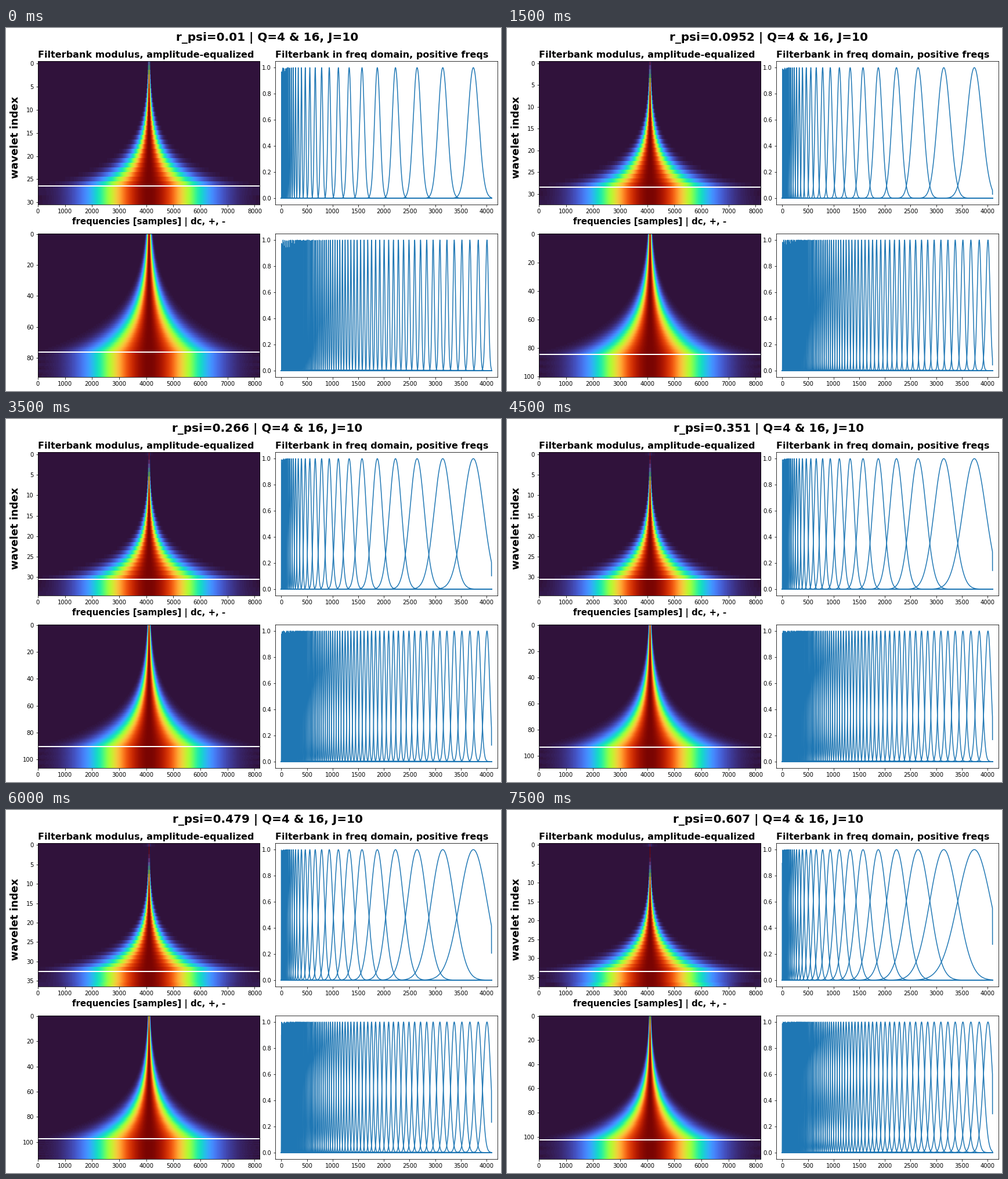
Animation, 853 px wide and 625 px high, one loop 8000 ms. Source, as a matplotlib script:

```python
import matplotlib.pyplot as plt
import numpy as np
from matplotlib.animation import FuncAnimation
from matplotlib.ticker import MultipleLocator

plt.rcParams["font.family"] = "DejaVu Sans"

WIDTH, HEIGHT, DPI = 853, 625, 72
N = 8192                      # signal length
J = 10
SIGMA_MIN = 0.13 / 2**J       # narrowest allowed bandwidth
R_PSI = np.linspace(0.01, 0.99, 24)
INTERVAL = 500
FRAMES = 16                   # the first state is held for two frames
FREQS = np.arange(N // 2 + 1)


def filter_params(Q, r):
    """Centre frequencies, bandwidths and the number of constant-Q wavelets."""
    ratio = 2 ** (1 / Q)
    xi_max = 1 / (1 + ratio)
    overlap = (1 - 1 / ratio) / (1 + 1 / ratio)
    sigma_max = xi_max * overlap / np.sqrt(2 * np.log(1 / r))
    n_cqt = int(np.ceil(Q * np.log2(sigma_max / SIGMA_MIN)))
    scale = ratio ** -np.arange(n_cqt)
    xi, sigma = xi_max * scale, sigma_max * scale
    low_xi = xi[-1] * np.arange(Q, 0, -1) / (Q + 1)
    xi = np.concatenate([xi, low_xi])
    sigma = np.concatenate([sigma, np.full(Q, SIGMA_MIN)])
    return xi * N, sigma * N, n_cqt


def morlet_bank(xi, sigma):
    """Analytic Morlet wavelets on the non-negative frequencies."""
    xi, sigma = xi[:, None], sigma[:, None]
    kappa = np.exp(-0.5 * (xi / sigma) ** 2)
    psi = np.exp(-0.5 * ((FREQS - xi) / sigma) ** 2)
    psi -= kappa * np.exp(-0.5 * (FREQS / sigma) ** 2)
    psi[:, -1] /= 2
    return psi


def time_modulus(psi):
    mod = np.fft.fftshift(np.abs(np.fft.ifft(psi, N, axis=1)), axes=1)
    return mod / mod.max(axis=1, keepdims=True)


fig = plt.figure(figsize=(WIDTH / DPI, HEIGHT / DPI), dpi=DPI, facecolor="white")
grid = fig.add_gridspec(
    2, 2, left=54.8 / WIDTH, right=846.8 / WIDTH,
    top=1 - 57 / HEIGHT, bottom=1 - 601 / HEIGHT, wspace=0.07, hspace=0.2)


def label(x, y, text, size, **kw):
    """Bold text centred on x with its baseline at y, in pixels from top left."""
    return fig.text(x / WIDTH, 1 - y / HEIGHT, text, size=size, weight="bold",
                    ha="center", va="baseline", **kw)


class BankRow:
    """One row of panels: time modulus on the left, spectra on the right."""

    def __init__(self, row, Q, tick_step):
        self.Q = Q
        self.map_ax = fig.add_subplot(grid[row, 0])
        self.freq_ax = fig.add_subplot(grid[row, 1])
        self.image = self.map_ax.imshow(
            np.zeros((2, N)), cmap="turbo", vmin=0, vmax=1,
            aspect="auto", interpolation="nearest")
        self.divider = self.map_ax.axhline(0, color="white", lw=2)
        self.map_ax.set_xlim(-0.5, N - 0.5)
        self.map_ax.xaxis.set_major_locator(MultipleLocator(1000))
        self.map_ax.yaxis.set_major_locator(MultipleLocator(tick_step))

        margin = 0.028 * N / 2
        self.freq_ax.set_xlim(-margin, N / 2 + margin)
        self.freq_ax.set_ylim(-0.05, 1.05)
        self.freq_ax.xaxis.set_major_locator(MultipleLocator(500))
        self.freq_ax.yaxis.set_major_locator(MultipleLocator(0.2))

    def show(self, r):
        xi, sigma, n_cqt = filter_params(self.Q, r)
        psi = morlet_bank(xi, sigma)
        n = len(xi)
        self.image.set_data(time_modulus(psi))
        self.image.set_extent((-0.5, N - 0.5, n - 0.5, -0.5))
        self.map_ax.set_ylim(n - 0.5, -0.5)
        self.divider.set_ydata([n_cqt - 0.5] * 2)
        for line in list(self.freq_ax.lines):
            line.remove()
        self.freq_ax.plot(FREQS, psi.T, color="tab:blue", lw=1.5)


rows = [BankRow(0, 4, 5), BankRow(1, 16, 20)]
title_style = dict(loc="left", fontsize=16, fontweight="bold")
rows[0].map_ax.set_title("Filterbank modulus, amplitude-equalized", **title_style)
rows[0].freq_ax.set_title("Filterbank in freq domain, positive freqs", **title_style)
label(246, 338, "frequencies [samples] | dc, +, -", 15)
label(21, 188, "wavelet index", 18, rotation=90, rotation_mode="anchor")
heading = label(450.6, 22, "", 20)


def update(i):
    r = R_PSI[max(0, i - 1)]
    heading.set_text(f"r_psi={r:.3g} | Q=4 & 16, J={J}")
    for row in rows:
        row.show(r)
    return []


anim = FuncAnimation(fig, update, frames=FRAMES, interval=INTERVAL,
                     init_func=lambda: [], repeat=True, repeat_delay=0)
plt.show()
```
